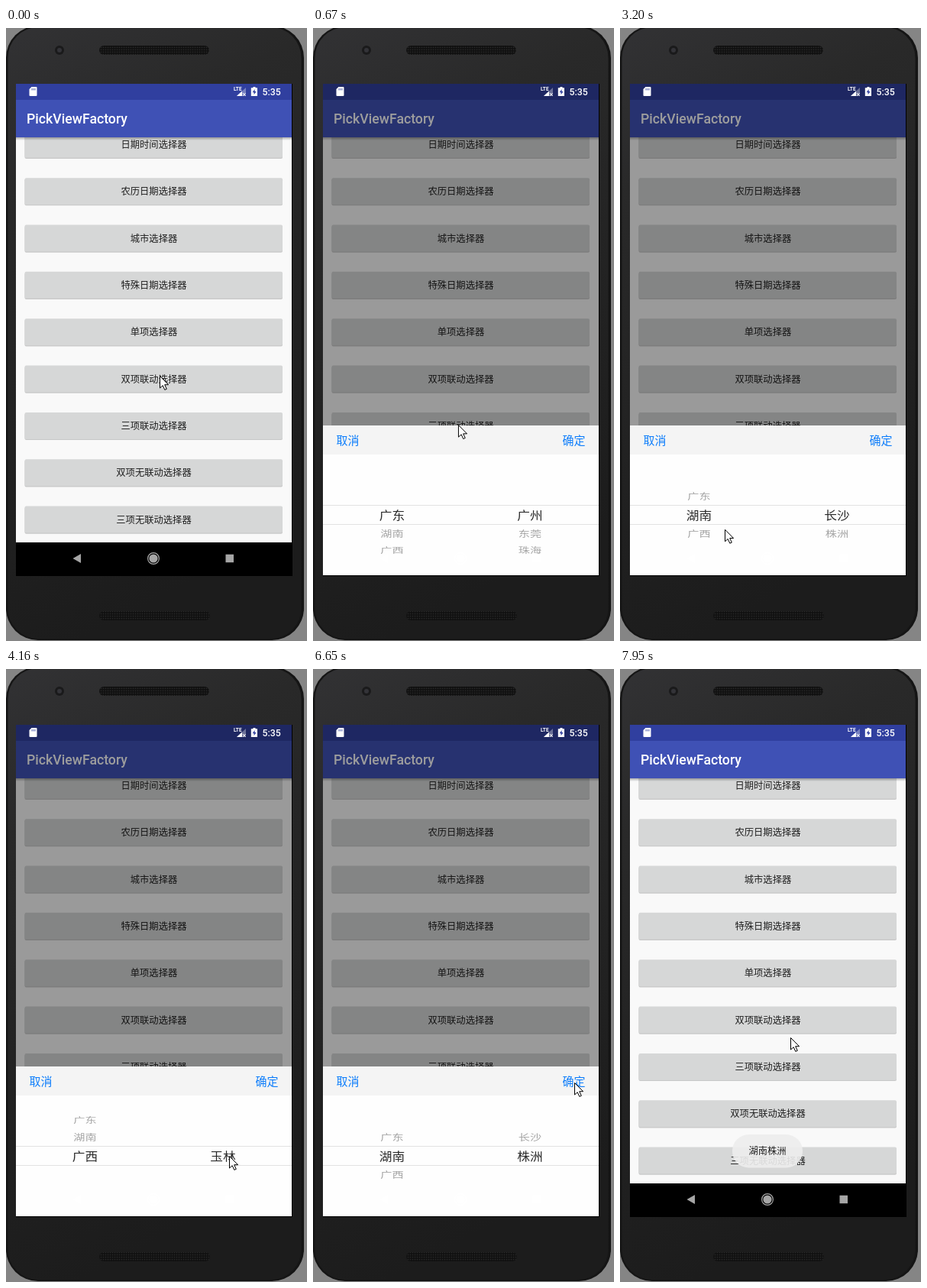
Write an HTML page that moves like this. It is 394 px wide and 802 px high and loops after 8 s.

```html
<!DOCTYPE html>
<html lang="zh-CN">
<head>
<meta charset="utf-8">
<title>PickViewFactory</title>
<style>
html, body { margin: 0; width: 100%; height: 100%; overflow: hidden; background: #858585; }
svg { display: block; width: 100%; height: 100%; }
text { font-family: Roboto, "Noto Sans CJK SC", "Noto Sans CJK", sans-serif; }
.mid { text-anchor: middle; }
.label { font-size: 12.3px; fill: #202020; }
.blue { font-size: 15px; fill: #0d7dfb; }
.wheel { font-size: 15.2px; }
</style>
</head>
<body>
<svg viewBox="0 0 394 802">
  <defs>
    <linearGradient id="face" x1="0" y1="0" x2=".25" y2="1">
      <stop offset="0" stop-color="#323234"/><stop offset=".25" stop-color="#292929"/><stop offset="1" stop-color="#1c1c1c"/>
    </linearGradient>
    <linearGradient id="fall" x1="0" y1="0" x2="0" y2="1">
      <stop offset="0" stop-opacity=".3"/><stop offset="1" stop-opacity="0"/>
    </linearGradient>
    <pattern id="mesh" width="3" height="3" patternUnits="userSpaceOnUse">
      <rect width="3" height="3" fill="#111"/><circle cx="1.5" cy="1.5" r=".8" fill="#2a2a2a"/>
    </pattern>
    <clipPath id="screen"><path d="M13 73H374V716H13Z"/></clipPath>
    <clipPath id="content"><path d="M13 143H374V673H13Z"/></clipPath>
    <clipPath id="band"><path d="M13 625H374V649H13Z"/></clipPath>
    <clipPath id="around"><path d="M13 558H374V625H13ZM13 649H374V716H13Z"/></clipPath>
  </defs>

  <!-- phone -->
  <rect width="394" height="802" fill="#858585"/>
  <rect y="-3" width="390" height="804" rx="42" fill="#151515"/>
  <rect x="2.5" y="-1" width="384" height="800" rx="40" fill="url(#face)"/>
  <circle cx="70" cy="29" r="6" fill="#1a1a1b"/><circle cx="70" cy="29" r="3" fill="#333338"/>
  <rect x="122" y="23" width="144" height="12" rx="6" fill="url(#mesh)"/>
  <rect x="122" y="763" width="145" height="12" rx="6" fill="url(#mesh)"/>
  <path d="M13 73H375V717H13Z"/>

  <g clip-path="url(#screen)">
    <path d="M13 143H374V673H13Z" fill="#f9f9f9"/>
    <g id="buttons" clip-path="url(#content)"></g>
    <rect x="13" y="143" width="361" height="4" fill="url(#fall)"/>
    <path d="M13 73H374V143H13Z" fill="#3f51b5"/>
    <path d="M13 73H374V94H13Z" fill="#303f9f"/>
    <text x="27" y="125" font-size="17.7" font-weight="500" fill="#fff">PickViewFactory</text>
    <path id="dim" d="M13 73H374V716H13Z"/>

    <g fill="#fff">
      <path d="M33.500 77h6q1 0 1 1v10q0 1-1 1h-8q-1 0-1-1v-8z"/>
      <path d="M34 79v2.500m2 0v-2.500m2 0v2.500" stroke="#303f9f" stroke-width=".8"/>
      <text x="298" y="82" font-size="6.5" font-weight="700">LTE</text>
      <path d="M314 78V89H302Z" opacity=".35"/><path d="M309 82.500V89H302Z"/>
      <path d="M310 85l3.500 4m0-4l-3.500 4" stroke="#fff"/>
      <path d="M323.500 77h3v1.200h2.500v10.800h-8.200v-10.800h2.700z"/>
      <path d="M325.600 80l-3 4.300h2v3l3-4.300h-2z" fill="#303f9f"/>
      <text x="335.500" y="88" font-size="12.3" font-weight="500">5:35</text>
    </g>

    <g id="sheet">
      <path d="M13 520H374V716H13Z" fill="#fefefe"/>
      <path d="M13 520H374V558H13Z" fill="#f4f4f4"/>
      <path d="M13 624.500H374M13 649.500H374" stroke="#e2e2e2"/>
      <text class="blue" x="30.500" y="545">取消</text>
      <text class="blue" x="326.500" y="545">确定</text>
      <g id="outer" clip-path="url(#around)" fill="#a4a4a4"></g>
      <g id="inner" clip-path="url(#band)" fill="#2a2a2a"></g>
    </g>

    <g id="nav">
      <path d="M87.500 694L98 688V700Z"/>
      <circle cx="193" cy="694" r="5.600"/>
      <circle cx="193" cy="694" r="7.400" fill="none" stroke="currentColor" stroke-width="1.200"/>
      <rect x="287.500" y="688.700" width="10.500" height="10.500"/>
    </g>
  </g>

  <g id="toast">
    <rect x="147" y="609" width="92" height="43.500" rx="21.500" fill="#eee" opacity=".9"/>
    <text class="mid label" x="193" y="635">湖南株洲</text>
  </g>
  <path id="cursor" d="M.5 .5V16L4.200 12.700L6.800 18.400L9.300 17.300L6.700 11.700H11.600Z" fill="#fff" stroke="#000"/>
</svg>

<script>
const $ = id => document.getElementById(id);
const LOOP = 8000;

function add(parent, tag, attrs, text = '') {
  const el = document.createElementNS('http://www.w3.org/2000/svg', tag);
  for (const k in attrs) el.setAttribute(k, attrs[k]);
  el.textContent = text;
  parent.append(el);
  return el;
}

const pickers = ['日期时间', '农历日期', '城市', '特殊日期', '单项', '双项联动', '三项联动', '双项无联动', '三项无联动'];
pickers.forEach((name, i) => {
  const y = 134.8 + i * 61.35, box = { x: 24.5, width: 337.5, height: 35, rx: 2 };
  add($('buttons'), 'rect', { ...box, y: y + 1.2, opacity: .2 });
  add($('buttons'), 'rect', { ...box, y, fill: '#d6d7d7' });
  add($('buttons'), 'text', { class: 'mid label', x: 193.5, y: Math.round(y + 22) }, name + '选择器');
});

// Each wheel is drawn twice: grey around the selection band, dark inside it.
const provinces = ['广东', '湖南', '广西'];
const cities = [['广州', '东莞', '珠海'], ['长沙', '株洲'], ['玉林']];
const makeRows = id => provinces.map(() => add($(id), 'text', { class: 'mid wheel', y: 5.7 }));
const makeWheel = x => ({ x, outer: makeRows('outer'), inner: makeRows('inner') });
const left = makeWheel(103.5), right = makeWheel(284);
const RADIUS = 79.6, STEP = Math.PI / 10;

function drawWheel(wheel, items, scroll) {
  for (let i = 0; i < 3; i++) {
    const angle = (i - scroll) * STEP;
    const y = 637 + RADIUS * Math.sin(angle), squash = Math.cos(angle);
    const place = (el, sx, sy) => {
      el.textContent = items[i] || '';
      el.setAttribute('transform', `translate(${wheel.x} ${y}) scale(${sx} ${sy})`);
    };
    place(wheel.outer[i], 1, squash * .8);
    place(wheel.inner[i], 1.1, squash);
  }
}

const ramp = (t, start, end) => Math.min(1, Math.max(0, (t - start) / (end - start)));
const ease = (t, start, end) => { const p = ramp(t, start, end); return p * p * (3 - 2 * p); };
const bump = (t, start, end) => Math.sin(Math.PI * ramp(t, start, end));

// Pointer moves: start, end, x, y; it rests in between.
const moves = [
  [400, 670, 190, 519], [670, 1390, 147, 622], [1540, 2080, 143, 564], [2080, 2800, 137, 656],
  [3200, 3590, 141, 576], [3590, 4160, 292, 637], [4280, 4400, 296, 611],
  [4700, 4970, 150, 592], [4970, 5240, 147, 632], [5240, 5630, 288, 645],
  [5750, 6650, 342, 541], [7020, 7560, 268.5, 503], [7560, 7950, 223, 482]
];
function pointer(t) {
  let x = 201, y = 455;
  for (const [start, end, toX, toY] of moves) {
    const p = ramp(t, start, end);
    x += (toX - x) * p;
    y += (toY - y) * p;
  }
  return [x, y];
}

function draw(now) {
  const t = now % LOOP;
  const shown = ease(t, 340, 670) - ease(t, 7280, 7715);
  const province = t < 2650 ? 0 : t < 3850 || t >= 5350 ? 1 : 2;
  const leftScroll = ease(t, 1600, 2050) + .45 * bump(t, 1800, 2360) + ease(t, 3200, 3740) - ease(t, 4940, 5360);

  drawWheel(left, provinces, leftScroll);
  drawWheel(right, cities[province], ease(t, 5750, 6240));
  $('sheet').setAttribute('transform', `translate(0 ${196 * (1 - shown)})`);
  $('nav').style.color = $('nav').style.fill = shown > 0 ? '#fff' : '#a6a6a6';
  $('dim').style.opacity = .385 * (ease(t, 340, 520) - ease(t, 7560, 7780));
  $('toast').style.opacity = ease(t, 7240, 7500);
  $('cursor').setAttribute('transform', `translate(${pointer(t)})`);
  requestAnimationFrame(draw);
}
requestAnimationFrame(draw);
</script>
</body>
</html>
```
